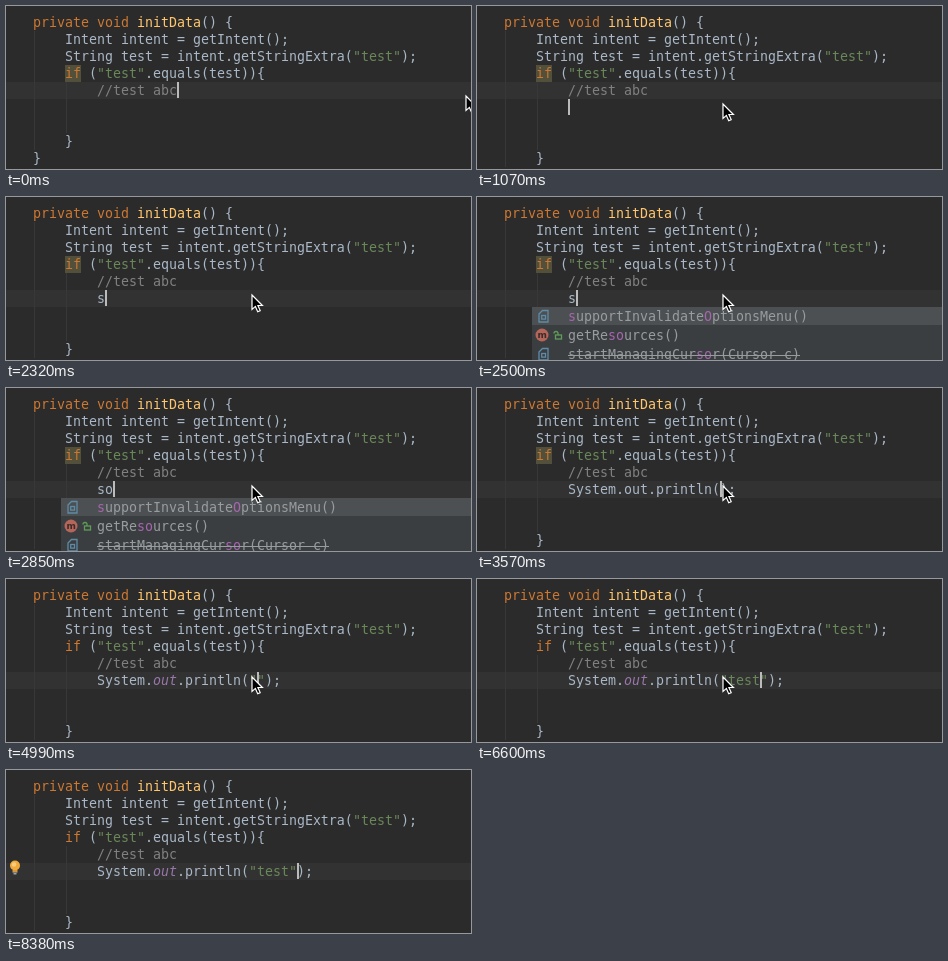
An HTML page with a canvas for the animation above (8730 ms loop, 465 by 163 pixels).

```html
<!DOCTYPE html>
<html lang="en">
<head>
<meta charset="utf-8">
<title>Typing in a code editor</title>
<style>
html, body { margin: 0; width: 100%; height: 100%; overflow: hidden; background: #2b2b2b; }
canvas { display: block; }
</style>
</head>
<body>
<canvas id="stage" width="465" height="163"></canvas>
<script>
const ctx = document.getElementById('stage').getContext('2d');
const LOOP = 8730;
const LEFT = 27, TOP = 8, LINE = 17, CHAR = 8;
const FONT = '13.29px "DejaVu Sans Mono", monospace';
const C = {
  back: '#2b2b2b', row: '#323232', guide: '#383838', warn: '#52503a', caret: '#bbbbbb',
  text: '#a9b7c6', key: '#cc7832', decl: '#ffc66d', str: '#6a8759', note: '#808080', field: '#9876aa',
  popup: '#3b3e40', pick: '#4c5052', item: '#999c9e', match: '#a566ad'
};

// Each step overrides part of the state before it.
const steps = [
  { at: 0, code: null, row: 4, caret: [4, 18], mouse: [460, 90], warn: true, bulb: false, popup: null, italic: false },
  { at: 180, mouse: [392, 93] },
  { at: 350, mouse: [290, 96] },
  { at: 530, mouse: [246, 98], bulb: true },
  { at: 890, bulb: false },
  { at: 1070, code: '', caret: [5, 8] },
  { at: 2150, row: 5 },
  { at: 2320, code: 's', caret: [5, 9] },
  { at: 2500, popup: 'methods' },
  { at: 2680, code: 'so', caret: [5, 10] },
  { at: 2860, code: 'sou', caret: [5, 11], popup: 'templates' },
  { at: 3030, code: 'sout', caret: [5, 12] },
  { at: 3390, caret: null },
  { at: 3570, code: 'System.out.println();', popup: null, caret: [5, 27] },
  { at: 3930, warn: false },
  { at: 4100, italic: true },
  { at: 4460, code: 'System.out.println("");', caret: [5, 28] },
  { at: 4640, caret: [5, 29] },
  { at: 4990, caret: [5, 28] },
  { at: 5890, caret: null, bulb: true },
  { at: 6240, code: 'System.out.println("t");', caret: [5, 29], bulb: false },
  { at: 6420, code: 'System.out.println("tes");', caret: [5, 31] },
  { at: 6600, code: 'System.out.println("test");', caret: [5, 32] },
  { at: 7660, caret: [5, 33] },
  { at: 8200, bulb: true },
  { at: 8380, mouse: null }
];

// Matched letters stand between bars.
const popups = {
  methods: [
    { icon: 'file', text: '|s|upportInvalidate|O|ptionsMenu()' },
    { icon: 'method', text: 'getRe|so|urces()' },
    { icon: 'file', text: 'startManagingCur|so|r(Cursor c)', strike: true }
  ],
  templates: [
    { text: '|sout|', side: 'Prints a string to', sideX: 315 },
    { icon: 'method', text: '|s|etFinishOnTouch|Out|side(boolean finish)' },
    { text: '|sout|m', side: 'Prints current class and method names to', sideX: 147 }
  ]
};

const rowTop = row => TOP + row * LINE;

function rect(x, y, w, h, color) {
  ctx.fillStyle = color;
  ctx.fillRect(x, y, w, h);
}

function disc(x, y, r, color) {
  ctx.fillStyle = color;
  ctx.beginPath();
  ctx.arc(x, y, r, 0, Math.PI * 2);
  ctx.fill();
}

function write(str, x, y, color, style = '') {
  ctx.font = style + FONT;
  ctx.fillStyle = color;
  ctx.fillText(str, x, y);
  return x + str.length * CHAR;
}

function line(row, col, ...parts) {
  let x = LEFT + col * CHAR;
  for (const [str, color = C.text, style] of parts) x = write(str, x, rowTop(row) + 13, color, style);
}

function typedParts(code, italic) {
  return code.split(/(\bout\b|"[^"]*")/).map(part => {
    if (part[0] === '"') return [part, C.str];
    return part === 'out' && italic ? [part, C.field, 'italic '] : [part];
  });
}

function drawCode(s) {
  const shift = s.code === null ? 0 : 1;
  rect(0, rowTop(s.row), 465, LINE, C.row);
  rect(28, rowTop(1), 1, (7 + shift) * LINE, C.guide);
  rect(60, rowTop(4), 1, (3 + shift) * LINE, C.guide);
  if (s.warn) rect(59, rowTop(3), 16, LINE, C.warn);

  line(0, 0, ['private void ', C.key], ['initData', C.decl], ['() {']);
  line(1, 4, ['Intent intent = getIntent();']);
  line(2, 4, ['String test = intent.getStringExtra('], ['"test"', C.str], [');']);
  line(3, 4, ['if ', C.key], ['('], ['"test"', C.str], ['.equals(test)){']);
  line(4, 8, ['//test abc', C.note]);
  if (s.code) line(5, 8, ...typedParts(s.code, s.italic));
  line(7 + shift, 4, ['}']);
  line(8 + shift, 0, ['}']);

  if (s.caret) rect(LEFT + s.caret[1] * CHAR, rowTop(s.caret[0]), 2, LINE - 1, C.caret);
}

function fileIcon(y) {
  ctx.strokeStyle = '#5f8ba6';
  ctx.lineWidth = 1.3;
  ctx.beginPath();
  [[62, -2], [65.5, -5.5], [71, -5.5], [71, 6], [62, 6]].forEach(([x, dy]) => ctx.lineTo(x, y + dy));
  ctx.closePath();
  ctx.stroke();
  ctx.strokeRect(64.7, y - 0.5, 3.8, 3.6);
}

function methodIcon(y) {
  disc(65, y, 6.5, '#b5665a');
  ctx.font = 'bold 9px "DejaVu Sans", sans-serif';
  ctx.fillStyle = '#3b2b2a';
  ctx.fillText('m', 60.4, y + 3);
  ctx.strokeStyle = '#5f9c58';
  ctx.lineWidth = 1.3;
  ctx.strokeRect(78.5, y, 6, 4);
  ctx.beginPath();
  ctx.arc(79, y - 1.5, 2, Math.PI, 0);
  ctx.lineTo(81, y);
  ctx.stroke();
}

function drawPopup(items) {
  rect(55, 110, 410, 53, C.popup);
  rect(55, 110, 410, 18, C.pick);
  items.forEach((item, i) => {
    const y = 119 + i * 19;
    if (item.icon === 'file') fileIcon(y);
    if (item.icon === 'method') methodIcon(y);
    let x = 91;
    item.text.split('|').forEach((part, k) => { x = write(part, x, y + 5, k % 2 ? C.match : C.item); });
    if (item.strike) rect(91, y + 1, x - 91, 1, C.item);
    if (item.side) write(item.side, item.sideX, y + 5, '#8b8e90');
  });
}

function drawBulb(row) {
  const y = rowTop(row) - 3;
  disc(9, y + 5.5, 5, '#f0aa3c');
  disc(8, y + 4.5, 2.3, '#f8cb78');
  rect(6.5, y + 10, 5, 2, '#d79a3e');
  rect(6.5, y + 12, 5, 1, '#777777');
  rect(7.5, y + 13, 3, 1.5, '#a0a0a0');
}

function drawMouse([x, y]) {
  const outline = [[0, 0], [0, 14.5], [3.4, 11.4], [5.7, 16.7], [8.2, 15.6], [5.9, 10.5], [10.4, 10.5]];
  ctx.beginPath();
  outline.forEach(([dx, dy]) => ctx.lineTo(x + dx, y + dy));
  ctx.closePath();
  ctx.fillStyle = '#000';
  ctx.fill();
  ctx.strokeStyle = '#fff';
  ctx.lineWidth = 1.2;
  ctx.stroke();
}

function draw(now) {
  const t = now % LOOP;
  const s = Object.assign({}, ...steps.filter(step => step.at <= t));
  rect(0, 0, 465, 163, C.back);
  drawCode(s);
  if (s.popup) drawPopup(popups[s.popup]);
  if (s.bulb) drawBulb(s.row);
  if (s.mouse) drawMouse(s.mouse);
}

let start;
function tick(now) {
  start ??= now;
  draw(now - start);
  requestAnimationFrame(tick);
}
draw(0);
requestAnimationFrame(tick);
</script>
</body>
</html>
```
